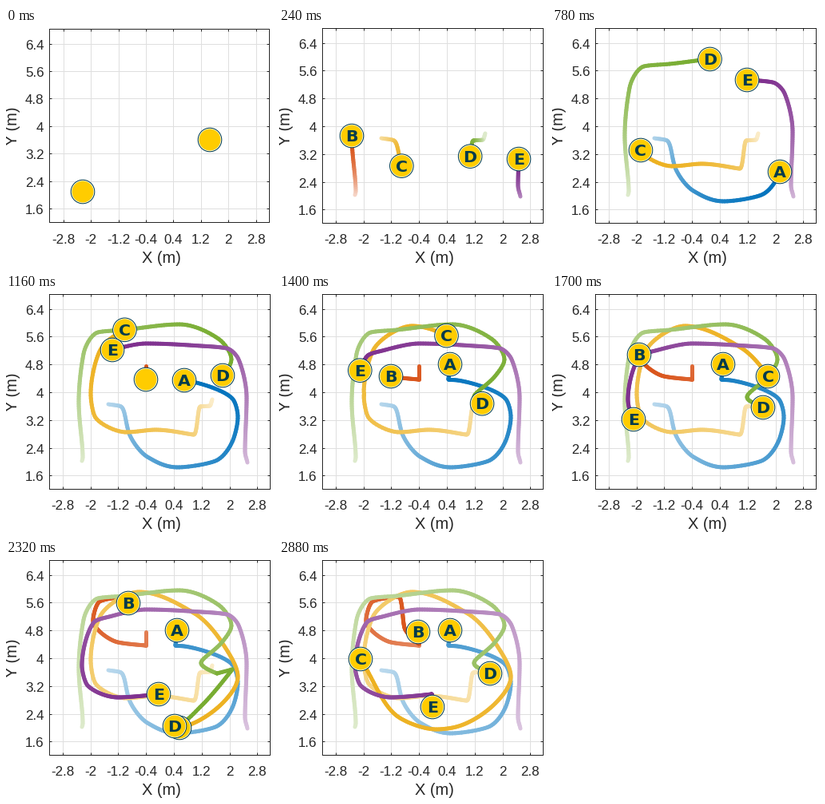
Recreate the animation shown at these times as a matplotlib script. Size 334 by 298 pixels, loop 3 s.

```python
import numpy as np
import matplotlib.pyplot as plt
from matplotlib.animation import FuncAnimation
from matplotlib.collections import LineCollection
from matplotlib.colors import to_rgb
from matplotlib.patches import Circle

W, H, DPI = 334, 298, 100
PX = 72 / DPI
TICK, INK, GOLD, NAVY = 20, "#262626", "#ffcc00", "#003b4c"
COLORS = dict(A="#0072bd", B="#d95319", C="#edb120", D="#77ac30", E="#7e2f8e")
RENAME = 11  # step at which the robots get their final names

plt.rcParams["font.family"] = "Liberation Sans"
fig = plt.figure(figsize=(W / DPI, H / DPI), dpi=DPI, facecolor="white")
ax = fig.add_axes([0, 0, 1, 1])
ax.set(xlim=(0, W), ylim=(H, 0))
ax.axis("off")

# Steps last 60 ms, with a slightly longer one every 15 steps
hold = np.full(48, 60)
hold[13::15] = 80
STARTS = np.cumsum(hold) - hold


def plot_frame(cx, cy, k, left, top, right, bottom):
    """Grid, box, ticks and labels of one axes layout."""
    grid, dark, parts = [], [], []
    for v in np.arange(-2.8, 2.9, 0.8):
        x = np.floor(cx + k * v) + 0.5
        grid.append([(x, top), (x, bottom)])
        dark += [[(x, top), (x, top + 3)], [(x, bottom), (x, bottom - 3)]]
        parts.append(ax.text(x - 0.5, 264.5, f"{v:.2g}", size=17 * PX, color=INK,
                             ha="center", va="center_baseline"))
    for v in np.arange(1.6, 6.5, 0.8):
        y = np.floor(cy - k * (v - 4)) + 0.5
        grid.append([(left, y), (right, y)])
        dark += [[(left, y), (left + 3, y)], [(right, y), (right - 3, y)]]
        parts.append(ax.text(47.5, y + 0.5, f"{v:.2g}", size=17 * PX, color=INK,
                             ha="right", va="center_baseline"))
    dark.append([(left, top), (right, top), (right, bottom),
                 (left, bottom), (left, top)])
    for lines, color, z in ((grid, "#dfdfdf", 1), (dark, INK, 2)):
        lines = LineCollection(lines, colors=color, linewidths=PX, zorder=z)
        lines.set_snap(False)
        parts.append(ax.add_collection(lines, autolim=False))
    return parts


layouts = [plot_frame(192.6, 123.3, 43, 54.5, 1.5, 329.5, 243.5),
           plot_frame(193, 123.5, 43.5, 54.5, 0.5, 330.5, 244.5)]
ax.text(194, 288, "X (m)", size=20 * PX, color=INK, ha="center", va="center")
ax.text(9, 123, "Y (m)", size=20 * PX, color=INK, rotation=90,
        ha="center", va="center")


class Path:
    """Smooth motion through (step, x, y) keys, without overshoot."""

    def __init__(self, *keys):
        keys = np.array(keys, float)
        self.t, self.p = keys[:, 0], keys[:, 1:]
        d = np.diff(self.p, axis=0) / np.diff(self.t)[:, None]
        a, b = d[:-1], d[1:]
        same = a * b > 0
        mean = np.where(same, 2 * a * b / np.where(same, a + b, 1), 0)
        self.v = np.vstack([d[:1], mean, d[-1:]])

    def at(self, t):
        t = np.clip(t, self.t[0], self.t[-1])
        i = np.clip(np.searchsorted(self.t, t) - 1, 0, len(self.t) - 2)
        h = (self.t[i + 1] - self.t[i])[:, None]
        u = (t - self.t[i])[:, None] / h
        s = u * u * (3 - 2 * u)
        return ((1 - s) * self.p[i] + s * self.p[i + 1]
                + h * u * (1 - u) * ((1 - u) * self.v[i] - u * self.v[i + 1]))

    def until(self, step):
        end = min(step, self.t[-1])
        t = np.linspace(self.t[0], end, 2 + int(6 * (end - self.t[0])))
        return t, self.at(t)


class Robot:
    def __init__(self, birth, names, path, stray=None):
        self.birth, self.names, self.path, self.stray = birth, names, path, stray
        self.trail = LineCollection([], linewidths=5 * PX, capstyle="round")
        ax.add_collection(self.trail, autolim=False)
        self.rim = ax.add_patch(Circle((0, 0), 14.8, fc="white", ec=NAVY, lw=PX))
        self.disc = ax.add_patch(Circle((0, 0), 13.5, fc=GOLD, ec="none"))
        self.label = ax.text(0, 0, "", family="DejaVu Sans", weight="bold",
                             size=20.5 * PX, color=NAVY, ha="center",
                             va="center_baseline")

    def draw(self, step):
        alive = step >= self.birth
        for part in (self.trail, self.rim, self.disc, self.label):
            part.set_visible(alive)
        if not alive:
            return
        name = self.names[step >= RENAME]
        order = ord(name) - ord("A")
        astray = self.stray and 31 <= step < 42
        t, xy = (self.stray if astray else self.path).until(step)

        # Older parts of a trail fade towards white
        age = 1 - np.clip(t[1:] / max(step, 1), 0, 1)
        alpha = (1 - 0.75 * age ** 1.7)[:, None]
        self.trail.set_segments(np.stack([xy[:-1], xy[1:]], axis=1))
        self.trail.set_color(1 - alpha * (1 - np.array(to_rgb(COLORS[name]))))
        self.trail.set_zorder(3 + order / 10)

        x, y = xy[-1]
        self.rim.center = self.disc.center = (x, y)
        self.label.set_position((x, y - 0.5))
        self.label.set_text(name if step > self.birth else "")
        for k, part in enumerate((self.rim, self.disc, self.label)):
            part.set_zorder(5 + order + k / 10)


path_a = Path((0.5, 128, 138), (1.7, 144, 141), (4.3, 155, 177), (6.4, 177, 204),
              (9, 215, 217), (11, 262, 209), (13, 285, 180), (14.3, 290, 154),
              (15.5, 284, 132), (19, 223, 108), (20, 212, 107), (22, 214, 88))
path_b = Path((18, 175, 90), (19, 175, 107), (23, 140, 103), (28, 109, 76),
              (32, 117, 52), (36.5, 150, 46), (38, 153, 54), (42, 157, 85),
              (45.5, 175, 105), (47, 174, 90))
path_c = Path((-1, 258, 132), (0, 255, 140), (2.5, 243, 141), (5.3, 235, 176),
              (9, 187, 170), (11, 150, 173), (13, 111, 153), (14.3, 106, 125),
              (17, 118, 70), (20, 166, 40), (25, 236, 67), (28, 270, 103),
              (31, 290, 146), (33.7, 272, 178), (38, 217, 210), (39.2, 197, 212),
              (42, 150, 197), (47, 102, 124))
keys_d = [(-0.3, 95, 209), (0, 96, 205), (4, 91, 135), (7.2, 97, 75),
          (9, 115, 48), (10.5, 147, 45), (14, 217, 38), (16.7, 267, 57),
          (18, 282, 82), (19, 271, 102), (21.5, 244, 129), (24, 264, 142)]
# False lead: waits, then runs after C until the track is corrected
lead_d = [(31, 264, 142), (32.3, 283, 137), (36, 245, 182), (38, 211, 208),
          (42, 155, 200)]
path_e = Path((1, 302, 211), (2, 299, 197), (6, 301, 130), (9, 291, 82),
              (10.5, 276, 68), (13, 244, 65), (17, 175, 62), (19, 133, 70),
              (21, 110, 78), (26, 95, 132), (28, 102, 157), (32.5, 140, 172),
              (38, 191, 168), (47, 192, 184))

# Names are given as before and after the renaming
robots = [Robot(1, "CA", path_a), Robot(19, "BB", path_b), Robot(0, "DC", path_c),
          Robot(0, "BD", Path(*keys_d), Path(*keys_d, *lead_d)),
          Robot(1, "EE", path_e)]


def update(i):
    step = np.searchsorted(STARTS, i * TICK, side="right") - 1
    for k, parts in enumerate(layouts):
        for part in parts:
            part.set_visible(k == min(step, 1))
    for robot in robots:
        robot.draw(step)
    return []


anim = FuncAnimation(fig, update, frames=3000 // TICK, interval=TICK,
                     init_func=lambda: update(0), repeat=True, repeat_delay=0,
                     blit=False)
plt.show()
```
